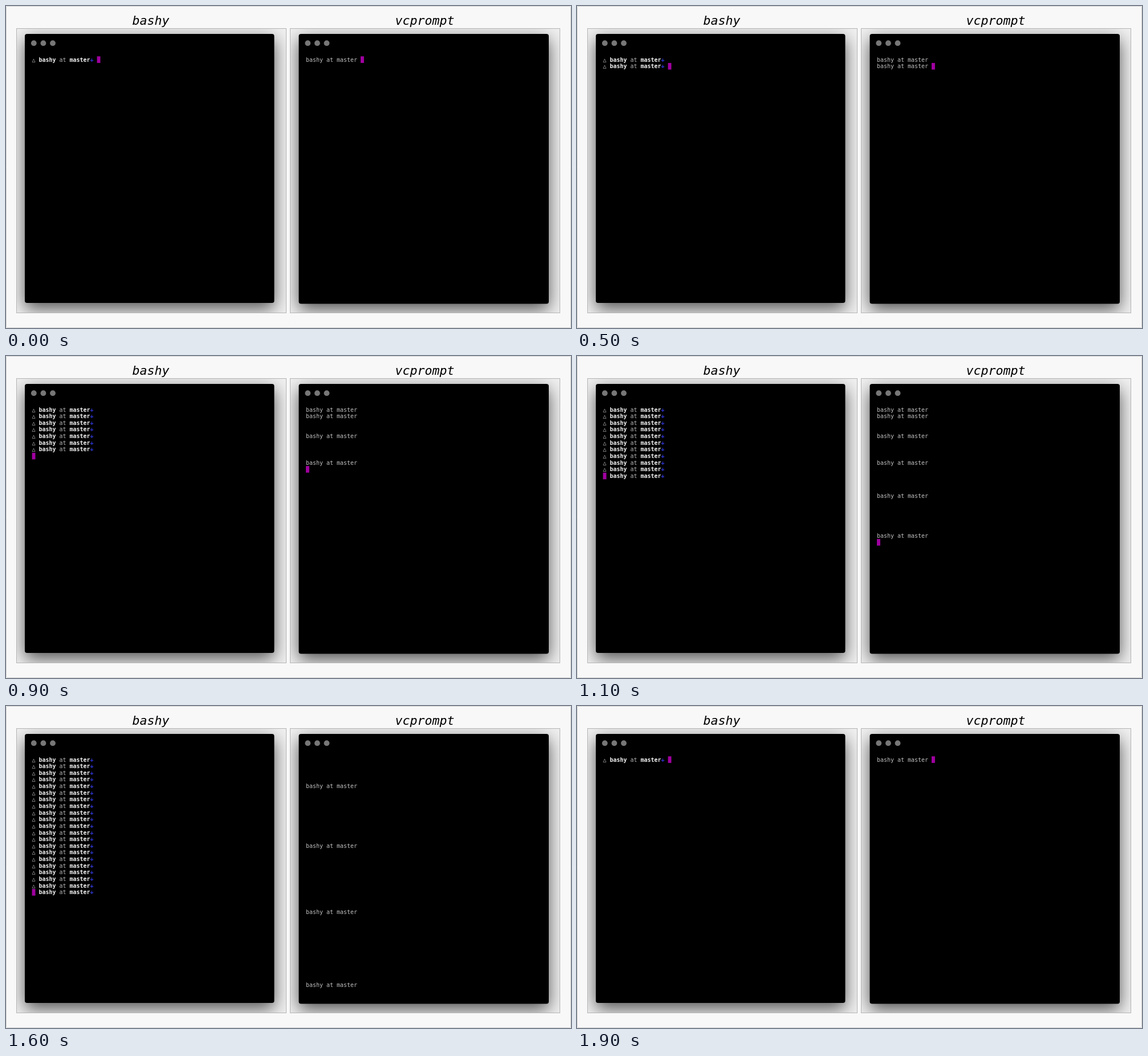
Animation, 991 px wide and 565 px high, one loop 2000 ms. Source, as an HTML page with a canvas:

```html
<!DOCTYPE html>
<html lang="en">
<head>
<meta charset="utf-8">
<title>Prompt speed comparison</title>
<style>
  html, body { margin: 0; width: 100%; height: 100%; overflow: hidden; background: #f8f8f8; }
  canvas { display: block; }
</style>
</head>
<body>
<canvas id="stage" width="991" height="565"></canvas>
<script>
const ctx = document.getElementById('stage').getContext('2d');
const LOOP = 2000, STEP = 100;
const COL = 6, ROW = 11.64, BASELINE = 97.5, LAST_ROW = 35;
const MONO = '"DejaVu Sans Mono", monospace';
const REGULAR = `9.97px ${MONO}`, BOLD = `bold ${REGULAR}`;

const LEFT = { panel: 18, x: 33, w: 437.5, h: 472, text: 45.6, title: 'bashy', titleX: 221.5 };
const RIGHT = { panel: 498, x: 513.5, w: 438.5, h: 473.5, text: 526, title: 'vcprompt', titleX: 682.5 };

// Cursor row of the fast prompt at each step.
const fastRows = [0, 0, 0, 1, 1, 1, 2, 3, 5, 7, 9, 10, 12, 14, 16, 18, 20, 22, 24, 0];

// Lines on which the slow prompt is printed, and how many are out at each step.
const slowLines = [0, 1, 4, 8, 13, 19, 26, 35, 45, 56, 68, 81];
const slowCounts = [1, 1, 1, 2, 2, 2, 2, 2, 3, 4, 5, 6, 7, 8, 8, 9, 10, 11, 12, 1];
const waitingRows = { 6: 2, 7: 3, 12: 34 };

function text(string, x, y, color, font) {
  ctx.font = font;
  ctx.fillStyle = color;
  ctx.fillText(string, x, y);
}

function roundRect(x, y, w, h, r, color) {
  ctx.fillStyle = color;
  ctx.beginPath();
  ctx.roundRect(x, y, w, h, r);
  ctx.fill();
}

function drawTerminal({ panel, x, w, h, title, titleX }) {
  ctx.save();
  ctx.beginPath();
  ctx.rect(panel, 39, 474, 500);
  ctx.clip();
  ctx.fillStyle = '#f0f0f0';
  ctx.fillRect(panel, 39, 474, 500);
  ctx.shadowColor = 'rgba(0, 0, 0, 0.66)';
  ctx.shadowBlur = 30;
  ctx.shadowOffsetY = 10;
  roundRect(x, 49, w, h, 4, '#000');
  ctx.restore();

  ctx.strokeStyle = '#b4b4b4';
  ctx.strokeRect(panel + 0.5, 39.5, 473, 499);
  ctx.fillStyle = '#777';
  for (let i = 0; i < 3; i++) {
    ctx.beginPath();
    ctx.arc(x + 15.8 + i * 16.6, 65.2, 4.9, 0, 2 * Math.PI);
    ctx.fill();
  }
  text(title, titleX, 33, '#000', `italic 21.6px ${MONO}`);
}

function drawCursor(terminal, row, col) {
  ctx.fillStyle = '#a000a0';
  ctx.fillRect(terminal.text + col * COL, 88.3 + row * ROW, 5.9, 11.6);
}

function drawFast(step) {
  const row = fastRows[step];
  const idle = row < 2;
  const printing = idle || step > 9;
  for (let i = 0; i < row + (printing ? 1 : 0); i++) {
    const y = BASELINE + i * ROW;
    const put = (string, col, color, font) => text(string, LEFT.text + col * COL, y, color, font);
    put('△', 0, '#d0d0d0', REGULAR);
    put('bashy', 2, '#f4f4f4', BOLD);
    put('at', 8, '#b8b8b8', REGULAR);
    put('master', 11, '#f4f4f4', BOLD);
    put('+', 17, '#3038d8', BOLD);
  }
  drawCursor(LEFT, row, idle ? 19 : 0);
}

function drawSlow(step) {
  const lines = slowLines.slice(0, slowCounts[step]);
  const last = lines[lines.length - 1];
  const scroll = Math.max(0, last + 1 - LAST_ROW);
  for (const line of lines) {
    if (line >= scroll) {
      text('bashy at master', RIGHT.text, BASELINE + (line - scroll) * ROW, '#c0c0c0', REGULAR);
    }
  }
  if (step < 6 || step === 19) drawCursor(RIGHT, last, 16);
  else if (step < 14) drawCursor(RIGHT, waitingRows[step] ?? last + 1 - scroll, 0);
}

function draw(now) {
  const step = Math.floor((now % LOOP) / STEP);
  ctx.fillStyle = '#f8f8f8';
  ctx.fillRect(0, 0, 991, 565);
  ctx.lineWidth = 1;
  ctx.strokeStyle = '#d0d0d0';
  ctx.beginPath();
  ctx.roundRect(0.5, 0.5, 990, 564, 2);
  ctx.stroke();
  drawTerminal(LEFT);
  drawTerminal(RIGHT);
  drawFast(step);
  drawSlow(step);
}

let start;
function tick(now) {
  start ??= now;
  draw(now - start);
  requestAnimationFrame(tick);
}
requestAnimationFrame(tick);
</script>
</body>
</html>
```
